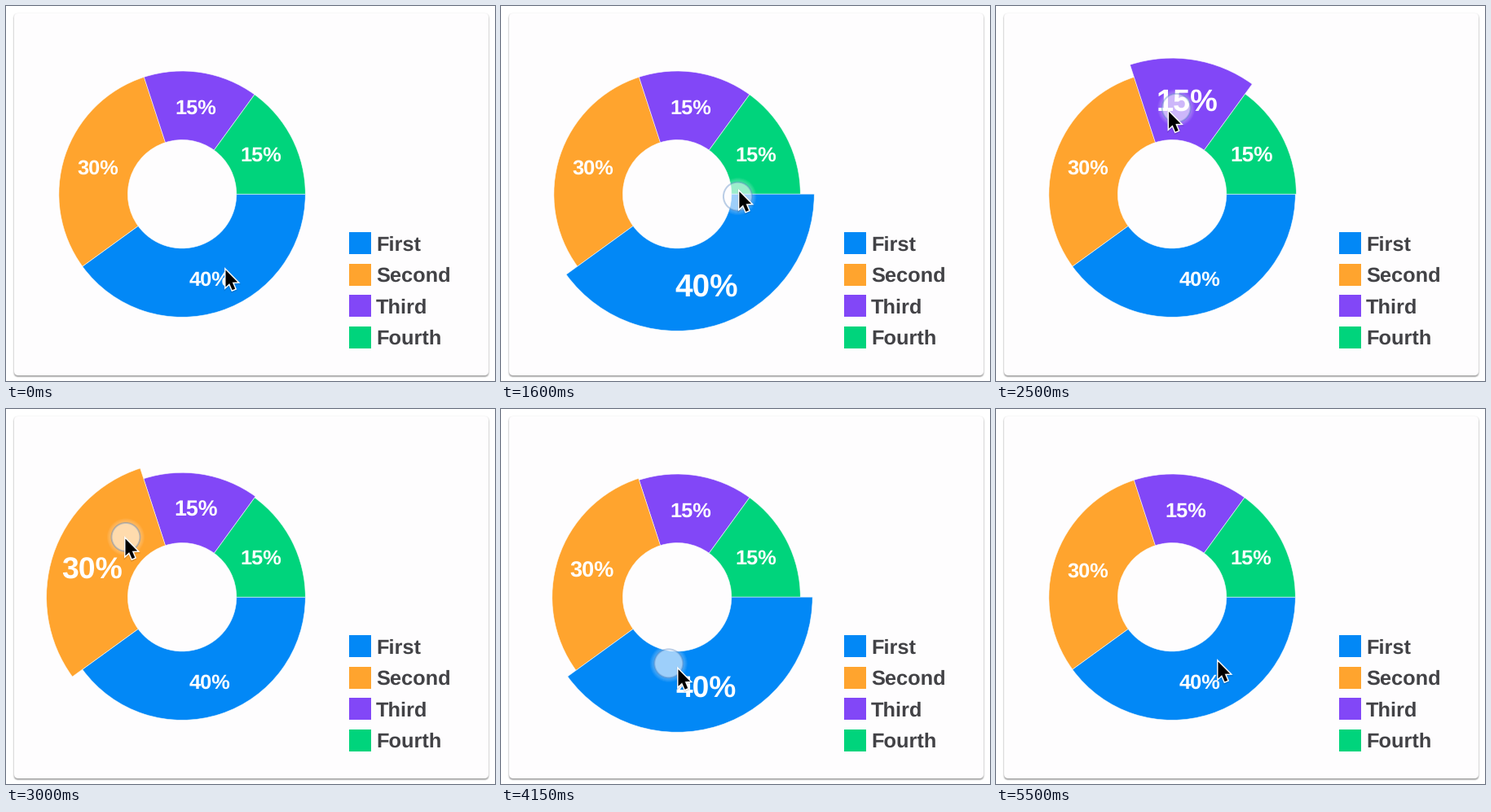
Recreate the animation shown at these times as a matplotlib script. Size 600 by 461 pixels, loop 5.55 s.

```python
import numpy as np
import matplotlib.pyplot as plt
from matplotlib.animation import FuncAnimation
from matplotlib.patches import Circle, FancyBboxPatch, Polygon, Rectangle, Wedge
from matplotlib.transforms import Affine2D

W, H, DPI = 600, 461, 64
FRAMES, STEP = 111, 50
PT = 72 / DPI  # points per pixel

CENTER = np.array([216.1, 231.2])
R_IN, R_OUT, GROW = 66.7, 151.2, 17
LABEL, LABEL_GROW = 25.4, 13.4
EASE_MS, LAG = 600, 50

NAMES = ["First", "Second", "Third", "Fourth"]
SHARES = [40, 30, 15, 15]
COLORS = ["#0288f6", "#ffa42e", "#8247f7", "#00d47c"]

# slice under the finger, and when each one is entered (last: release)
TOUCHED = [0, 3, 2, 1, 0]
ENTER = [100, 1600, 2140, 2680, 3850, 4850]

# pointer turning points: ms, x, y
TIMES, *XY = np.array([
    (0, 269, 323), (950, 272, 331), (1570, 291, 231), (2000, 301, 171),
    (2300, 248, 121), (3000, 146, 158), (3050, 146, 158), (3600, 108, 245),
    (3750, 128, 265), (4350, 250, 330), (4700, 272, 311), (4750, 272, 309),
], float).T

plt.rcParams.update({
    "font.family": "Liberation Sans",
    "font.weight": "bold",
    "text.hinting": "none",
})


def ease(u):
    return 1 - (1 - np.clip(u, 0, 1)) ** 3


def hover(k, t):
    return sum(ease((t - a) / EASE_MS) - ease((t - b) / EASE_MS)
               for j, a, b in zip(TOUCHED, ENTER, ENTER[1:]) if j == k)


def monotone_slopes(v):
    """Harmonic mean of neighbouring slopes, zero at turning points."""
    d = np.diff(v) / np.diff(TIMES)
    a, b = d[:-1], d[1:]
    same = a * b > 0
    inner = np.where(same, 2 * a * b / np.where(same, a + b, 1), 0)
    return np.concatenate([[0], inner, [0]])


SLOPES = [monotone_slopes(v) for v in XY]


def pointer(t):
    """Cubic Hermite interpolation along the path."""
    t = np.clip(t, TIMES[0], TIMES[-1])
    i = min(np.searchsorted(TIMES, t, "right"), len(TIMES) - 1) - 1
    h = TIMES[i + 1] - TIMES[i]
    u = (t - TIMES[i]) / h
    s = u * u * (3 - 2 * u)
    return [v[i] + s * (v[i + 1] - v[i])
            + h * u * (1 - u) * ((1 - u) * m[i] - u * m[i + 1])
            for v, m in zip(XY, SLOPES)]


fig = plt.figure(figsize=(W / DPI, H / DPI), dpi=DPI, facecolor="white")
ax = fig.add_axes([0, 0, 1, 1])
ax.set(xlim=(0, W), ylim=(H, 0))
ax.axis("off")


def card(pad, dy, color, alpha=1):
    ax.add_patch(FancyBboxPatch(
        (10 - pad, 9 - pad + dy), 582 + 2 * pad, 445 + 2 * pad,
        boxstyle=f"round,pad=0,rounding_size={5 + pad}",
        fc=color, ec="none", alpha=alpha, zorder=0))


for k in range(5):
    card(2 - .6 * k, 1 + .25 * k, "black", .02 + .025 * k)
card(0, 0, "#fefdfe")

wedges, labels, mids = [], [], []
start = 0
for k, (name, share, color) in enumerate(zip(NAMES, SHARES, COLORS)):
    end = start + 3.6 * share
    wedges.append(ax.add_patch(Wedge(
        CENTER, R_OUT, start, end, width=R_OUT - R_IN, fc=color,
        ec=(1, 1, 1, .7), lw=.7 * PT)))
    mid = np.radians((start + end) / 2)
    mids.append(np.array([np.cos(mid), np.sin(mid)]))
    labels.append(ax.text(0, 0, f"{share}%", color="white", ha="center",
                          va="baseline", zorder=4))
    start = end

    y = 278 + 38.5 * k
    ax.add_patch(Rectangle((421, y), 27, 27, fc=color, ec="none"))
    ax.text(454, y + 22.6, name, color="#424246", fontsize=LABEL * PT,
            va="baseline")

# soft halo, then the disc with its rim
touch = [Circle((0, 0), r, fc=(1, 1, 1, .06), ec="none", zorder=5)
         for r in range(18, 24)]
touch.append(Circle((0, 0), 17.5, fc=(1, 1, 1, .45), ec=(.3, .5, .75, .38),
                    lw=2 * PT, zorder=5))
for ring in touch:
    ax.add_patch(ring)

ARROW = np.array([(.7, 2), (.7, 22), (5.2, 17.8), (8.7, 26), (12, 24.6),
                  (8.6, 16.6), (14.8, 16.3)])


def arrow(color, width, alpha, zorder):
    return ax.add_patch(Polygon(ARROW, fc=color, ec=color, lw=width * PT,
                                alpha=alpha, joinstyle="miter", zorder=zorder))


arrows = [(arrow("black", 4, .12, 6), 1.2),
          (arrow("white", 3.2, 1, 7), 0),
          (arrow("black", .3, 1, 8), 0)]


def draw(i):
    t = i * STEP
    for k, (wedge, label, mid) in enumerate(zip(wedges, labels, mids)):
        w = hover(k, t)
        r = R_OUT + GROW * w
        wedge.set_radius(r)
        wedge.set_width(r - R_IN)
        wedge.set_zorder(2 + w)
        size = LABEL + LABEL_GROW * w
        x, y = CENTER + mid * (R_IN + r) / 2
        label.set_position((x, y + .345 * size))
        label.set_fontsize(size * PT)

    spot = pointer(t - LAG)
    for ring in touch:
        ring.set_center(spot)
        ring.set_visible(ENTER[0] <= t < ENTER[-1])

    x, y = pointer(t)
    for patch, dy in arrows:
        patch.set_transform(Affine2D().translate(x, y + dy) + ax.transData)
    return []


anim = FuncAnimation(fig, draw, frames=FRAMES, interval=STEP, repeat=True,
                     repeat_delay=0, blit=False)
plt.show()
```
